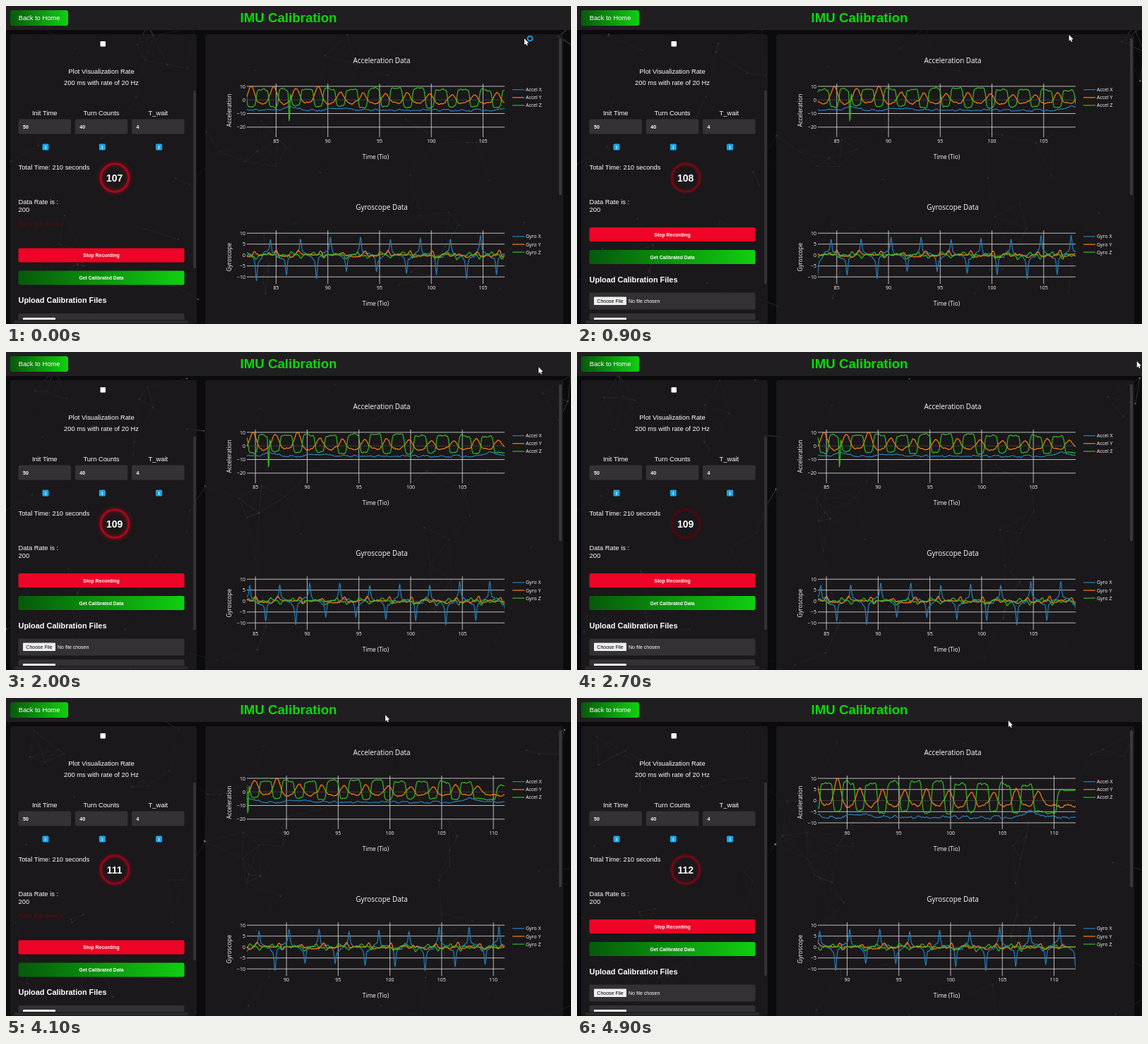
Animation of 800 by 451 pixels, one loop 5000 ms. Source, as an HTML page with a canvas:

```html
<!DOCTYPE html>
<html lang="en">
<head>
<meta charset="utf-8">
<title>IMU Calibration</title>
<style>
html, body { margin: 0; width: 100%; height: 100%; overflow: hidden; background: #0b0a0c; }
canvas { display: block; width: 800px; height: 451px; }
</style>
</head>
<body>
<canvas id="stage" width="800" height="451"></canvas>
<script>
const ctx = document.getElementById('stage').getContext('2d');
const LOOP = 5000;
const ARIAL = '"Liberation Sans", Arial, sans-serif';
const OPEN = '"Open Sans", Verdana, sans-serif';
const BLUE = '#2a7db8', ORANGE = '#ff7f0e', GREEN = '#33bb24', GRID = '#e4e4e4';
const PLOT = { left: 341, right: 706, height: 76, perSec: 14.65 };

// ---------- helpers ----------
const hash = n => { const s = Math.sin(n * 127.1 + 11.7) * 43758.5453; return s - Math.floor(s); };
const bump = (d, w) => Math.exp(-((d / w) ** 2));
const step = (t, at, w) => 1 / (1 + Math.exp((at - t) / w));
const wave = (t, peak, period) => 0.5 + 0.5 * Math.cos((t - peak) / period * 2 * Math.PI);

function noise(t, seed) {
  const i = Math.floor(t), f = t - i, s = f * f * (3 - 2 * f);
  const a = hash(i + seed * 977), b = hash(i + 1 + seed * 977);
  return 2 * (a + (b - a) * s) - 1;
}
const jitter = (t, seed, slow, fast) => slow * noise(t * 2.6, seed) + fast * noise(t * 9, seed + 50);

function text(str, x, y, size, { font = ARIAL, color = '#fff', weight = '', align = 'left' } = {}) {
  ctx.font = `${weight} ${size}px ${font}`;
  ctx.fillStyle = color;
  ctx.textAlign = align;
  ctx.fillText(str, x, y);
}

function box(x, y, w, h, r, fill) {
  ctx.fillStyle = fill;
  ctx.beginPath();
  ctx.roundRect(x, y, w, h, r);
  ctx.fill();
}

function line(x1, y1, x2, y2, color, width = 1) {
  ctx.strokeStyle = color;
  ctx.lineWidth = width;
  ctx.beginPath();
  ctx.moveTo(x1, y1);
  ctx.lineTo(x2, y2);
  ctx.stroke();
}

function greenFade(x, w) {
  const g = ctx.createLinearGradient(x, 0, x + w, 0);
  g.addColorStop(0, '#07590b');
  g.addColorStop(1, '#10d010');
  return g;
}

// ---------- sensor signals ----------
// Offset from the nearest pulse of a regular train, with a random factor for that pulse.
function nearest(t, first, period) {
  const k = Math.round((t - first) / period);
  return { d: t - first - k * period, rnd: hash(k + first) };
}
const TURN = 2.156, SPIN = 2.9, REST = 109.3;
const facingUp = t => nearest(t, 88, TURN);
const facingDown = t => nearest(t, 88 + TURN / 2, TURN);
const calm = t => 1 - .85 * step(t, 110.8, .05);

const accelX = t => -7.5 + 2 * bump(t - 86.4, .9) + 1.6 * bump(t - 91, 1)
  + 2.6 * bump(t - 107.6, .9) + jitter(t, 1, .7, .35);

function accelY(t) {
  const { d, rnd } = facingDown(t);
  const height = 6.5 + 1.5 * rnd + 4.5 * step(90, t, .3);
  return -2.5 + height * bump(d, .45) * (1 - step(t, REST, .1)) + jitter(t, 3, .8, .4);
}

function accelZ(t) {
  const { d, rnd } = facingUp(t);
  const turned = step(.62, Math.abs(d), .05) * (1 - step(t, REST - .7, .05));
  return -5 + (11.5 + 2 * rnd) * turned + 9.5 * step(t, 110.3, .06)
    - 24 * bump(t - 86.27, .07) + jitter(t, 5, 1, .5) * calm(t);
}

function gyroX(t) {
  const up = nearest(t, 87.35, SPIN), down = nearest(t, 88.9, SPIN);
  const kick = d => .75 * bump(d, .1) + .28 * bump(d, .45);
  return (6.5 + 3 * up.rnd) * kick(up.d) - (7.5 + 3.5 * down.rnd) * kick(down.d)
    + jitter(t, 7, 1.1, .4) * calm(t);
}

const gyroY = t => calm(t) * (1.9 * bump(facingDown(t - .25).d, .17) - .2 + jitter(t, 9, .9, .3));
const gyroZ = t => calm(t) * (1.2 * bump(facingUp(t - .6).d, .2)
  - 1.5 * bump(facingUp(t + .6).d, .17) + jitter(t, 11, .6, .3));

// ---------- background ----------
const dots = Array.from({ length: 85 }, (_, i) => ({
  x: hash(i) * 840, y: hash(i + 200) * 450,
  vx: (hash(i + 400) - .5) * 30, vy: (hash(i + 600) - .5) * 30, r: .6 + hash(i + 800) * .9
}));
const wrap = (v, n) => ((v % n) + n) % n;

function network(t) {
  const at = dots.map(d => [
    wrap(d.x + d.vx * t / 1000, 840) - 20, wrap(d.y + d.vy * t / 1000, 450) + 20, d.r]);
  at.forEach(([x, y, r], i) => {
    ctx.fillStyle = 'rgba(255,255,255,.35)';
    ctx.beginPath();
    ctx.arc(x, y, r, 0, 7);
    ctx.fill();
    for (let j = i + 1; j < at.length; j++) {
      const d = Math.hypot(x - at[j][0], y - at[j][1]);
      if (d < 75) line(x, y, at[j][0], at[j][1], `rgba(255,255,255,${.42 * (1 - d / 75)})`, .7);
    }
  });
}

function frame(t) {
  ctx.fillStyle = '#0b0a0c';
  ctx.fillRect(0, 0, 800, 451);
  network(t);
  box(6, 40, 264, 411, 4, 'rgba(30,28,31,.8)');
  box(282, 40, 507, 420, 4, 'rgba(30,28,31,.8)');
  ctx.fillStyle = '#201e21';
  ctx.fillRect(0, 0, 800, 34);
  box(6, 6, 82, 22, 3, greenFade(6, 82));
  text('Back to Home', 47, 20.3, 9.35, { align: 'center' });
  text('IMU Calibration', 400, 23, 18.7, { weight: 'bold', color: '#0ad80a', align: 'center' });
}

// ---------- left panel ----------
function ring(glow, count) {
  ctx.save();
  ctx.beginPath();
  ctx.arc(154, 243.6, 19.8, 0, 7);
  ctx.lineWidth = 2.4 + 1.2 * glow;
  ctx.strokeStyle = `rgb(${75 + 165 * glow},${4 + 4 * glow},${12 + 26 * glow})`;
  ctx.shadowColor = `rgba(255,0,30,${.1 + .85 * glow})`;
  ctx.shadowBlur = 2 + 7 * glow;
  ctx.stroke();
  ctx.restore();
  text(count, 153.7, 248.5, 14, { weight: 'bold', align: 'center' });
}

function fileRow(y) {
  box(17.5, y, 235, 24, 2, '#333134');
  box(24, y + 6, 46, 11.5, 1, '#f0f0f0');
  text('Choose File', 47, y + 14.3, 7, { color: '#000', align: 'center' });
  text('No file chosen', 73, y + 14.3, 7);
}

function controls(t, tick) {
  const mid = { align: 'center' };
  const glow = wave(t, 1550, 2000);
  box(133.5, 50, 7.5, 7.5, 1, '#fff');
  text('Plot Visualization Rate', 135, 95.5, 9.35, mid);
  text('200 ms with rate of 20 Hz', 135, 111.7, 9.35, mid);
  [['Init Time', 50], ['Turn Counts', 40], ['T_wait', 4]].forEach(([name, value], i) => {
    const x = 17.5 + 80.3 * i;
    text(name, x + 37.2, 155.3, 9.35, mid);
    box(x, 160.5, 74.5, 21, 2, '#343235');
    text(value, x + 6.5, 173.6, 7, { weight: 'bold' });
    box(x + 34, 195.5, 9, 9, 1.5, '#1ba8ea');
    text('i', x + 38.5, 202.8, 7, { weight: 'bold', align: 'center' });
  });
  text('Total Time: 210 seconds', 17.5, 232, 9.35);
  ring(glow, 107 + tick);
  text('Data Rate is :', 17.5, 281, 9.35);
  text('200', 17.5, 291.7, 9.35);

  // The prompt shows for two seconds out of four and pushes the rest down.
  const turning = (tick + 1) % 4 < 2;
  if (turning) text('Turn the device', 17.5, 311.5, 9.35, { color: `rgba(165,0,12,${.1 + .7 * (1 - glow)})` });
  ctx.save();
  ctx.beginPath();
  ctx.rect(6, 300, 258, 145);
  ctx.clip();
  ctx.translate(0, turning ? 0 : -29.5);
  box(17.5, 343.5, 235, 20, 2, '#ee0426');
  text('Stop Recording', 135, 356, 6.9, { weight: 'bold', align: 'center' });
  box(17.5, 375.5, 235, 20, 2, greenFade(17.5, 235));
  text('Get Calibrated Data', 135, 388, 6.8, { weight: 'bold', align: 'center' });
  text('Upload Calibration Files', 17.5, 421, 10.93, { weight: 'bold' });
  fileRow(436);
  fileRow(465.5);
  ctx.restore();

  box(265, 120, 4, turning ? 252 : 274, 1, '#333134');
  box(12, 446, 246, 4, 1, '#2b292c');
  box(783, 46, 4, 222, 1, '#3a383b');
}

// ---------- charts ----------
function chart(o, start) {
  const X = t => PLOT.left + (t - start) * PLOT.perSec;
  const Y = v => o.zero - v * o.unit;
  const label = { font: OPEN, align: 'center' };
  const end = start + (PLOT.right - PLOT.left) / PLOT.perSec;

  text(o.title, 532, o.top - 29.5, 9.93, label);
  text('Time (Tio)', 523.5, o.top + 106.7, 8.2, label);
  ctx.save();
  ctx.translate(319, o.top + 38);
  ctx.rotate(-Math.PI / 2);
  text(o.axis, 0, 0, 8.2, label);
  ctx.restore();

  for (let s = Math.ceil(start / 5) * 5; s <= end; s += 5) {
    line(X(s), o.top, X(s), o.top + PLOT.height, GRID, .8);
    text(s, X(s), o.top + 83.5, 7, label);
  }
  for (let v = 10; v >= o.low; v -= o.gap) {
    line(PLOT.left, Y(v), PLOT.right, Y(v), v ? GRID : '#444', .8);
    text(String(v).replace('-', '\u2212'), 339, Y(v) + 2.6, 7, { font: OPEN, align: 'right' });
  }

  ctx.save();
  ctx.beginPath();
  ctx.rect(PLOT.left, o.top, PLOT.right - PLOT.left, PLOT.height);
  ctx.clip();
  ctx.lineJoin = 'round';
  o.series.forEach(([, color, f]) => {
    ctx.beginPath();
    for (let i = Math.floor(start * 20); i <= end * 20 + 1; i++) ctx.lineTo(X(i / 20), Y(f(i / 20)));
    ctx.strokeStyle = color;
    ctx.lineWidth = 1.2;
    ctx.stroke();
  });
  ctx.restore();

  o.series.forEach(([name, color], i) => {
    const y = o.top + 8.7 + 11.1 * i;
    line(717, y, 734, y, color, 1.2);
    text(name, 736, y + 2.5, 7, { font: OPEN });
  });
}

function charts(tick) {
  const start = 82.17 + tick;
  const scale = start < 86.27
    ? { zero: 133.2, unit: 1.93, low: -20, gap: 10 }
    : { zero: 145.5, unit: 3.15, low: -10, gap: 5 };
  chart({
    title: 'Acceleration Data', axis: 'Acceleration', top: 110, ...scale,
    series: [['Accel X', BLUE, accelX], ['Accel Y', ORANGE, accelY], ['Accel Z', GREEN, accelZ]]
  }, start);
  chart({
    title: 'Gyroscope Data', axis: 'Gyroscope', top: 318.2,
    zero: 353.2, unit: 3.1, low: -10, gap: 5,
    series: [['Gyro X', BLUE, gyroX], ['Gyro Y', ORANGE, gyroY], ['Gyro Z', GREEN, gyroZ]]
  }, start);
}

// ---------- pointer ----------
const path = [[0, 734, 46], [1400, 676, 38], [2300, 793, 13], [2700, 793, 13],
  [3500, 595, 20], [4100, 537, 24], [LOOP, 620, 33]];

function pointer(t) {
  const i = path.findIndex(p => p[0] > t);
  const [t0, x0, y0] = path[i - 1], [t1, x1, y1] = path[i];
  const k = (t - t0) / (t1 - t0);
  const x = x0 + (x1 - x0) * k, y = y0 + (y1 - y0) * k;
  if (t < 900) {
    ctx.beginPath();
    ctx.arc(x + 8, y + .2, 3.4, 0, 7);
    ctx.strokeStyle = '#2196d8';
    ctx.lineWidth = 2;
    ctx.stroke();
  }
  ctx.save();
  ctx.translate(x, y);
  ctx.beginPath();
  [[0, 0], [0, 9], [2, 7.2], [3.4, 10.2], [4.8, 9.6], [3.5, 6.7], [6.2, 6.4]].forEach(p => ctx.lineTo(...p));
  ctx.closePath();
  ctx.fillStyle = '#fff';
  ctx.strokeStyle = '#000';
  ctx.lineWidth = .8;
  ctx.stroke();
  ctx.fill();
  ctx.restore();
}

const origin = performance.now();
function draw() {
  const t = (performance.now() - origin) % LOOP;
  const tick = Math.floor((t + 200) / 1000);
  frame(t);
  controls(t, tick);
  charts(tick);
  pointer(t);
  requestAnimationFrame(draw);
}
draw();
</script>
</body>
</html>
```
